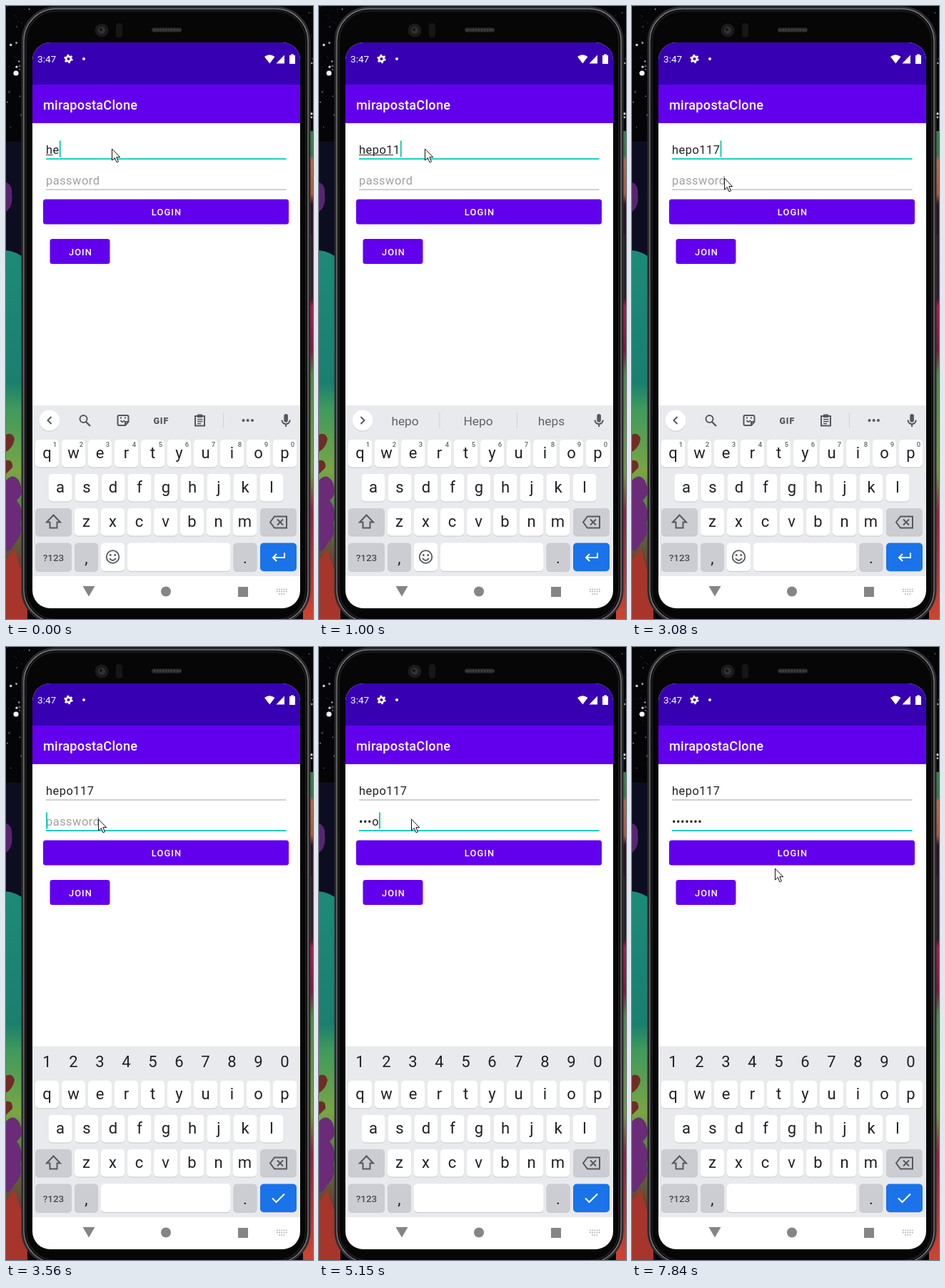
These frames come from a looping animation (430 px wide and 858 px high, 7.99 s). An HTML page:

```html
<!DOCTYPE html>
<html lang="en">
<head>
<meta charset="utf-8">
<title>Login form</title>
<style>
html, body { margin: 0; width: 100%; height: 100%; overflow: hidden; background: #050508; }
svg { display: block; width: 100vw; height: 100vh; }
text { font-family: Roboto, "Noto Sans", sans-serif; white-space: pre; }
.mid { text-anchor: middle; }
.line { fill: none; stroke: #55585d; stroke-width: 2; }
.field { font-size: 16.4px; letter-spacing: .03125em; fill: #222; }
.btn { font-size: 12.8px; font-weight: 500; letter-spacing: .089em; fill: #fff; text-anchor: middle; }
.key { font-size: 22px; fill: #202124; text-anchor: middle; }
.tip { font-size: 9.5px; font-weight: 500; fill: #62656a; text-anchor: middle; }
.word { font-size: 17.3px; fill: #5f6368; text-anchor: middle; }
</style>
</head>
<body>
<svg viewBox="0 0 430 858">
  <defs>
    <linearGradient id="land" x1="0" y1="0" x2="0" y2="1">
      <stop offset="0" stop-color="#1d8a78"/><stop offset=".36" stop-color="#1b7f6e"/>
      <stop offset=".43" stop-color="#3f9a5c"/><stop offset=".6" stop-color="#79a545"/>
      <stop offset=".72" stop-color="#4c7f45"/><stop offset=".86" stop-color="#6d3a30"/>
      <stop offset="1" stop-color="#b8402c"/>
    </linearGradient>
    <linearGradient id="side" x1="0" y1="0" x2="0" y2="1">
      <stop offset="0" stop-color="#3c7f4c"/><stop offset=".05" stop-color="#39774a"/>
      <stop offset=".06" stop-color="#b06a48"/><stop offset=".13" stop-color="#a85a44"/>
      <stop offset=".15" stop-color="#2b1420"/><stop offset=".34" stop-color="#35101f"/>
      <stop offset=".36" stop-color="#a51f4c"/><stop offset=".45" stop-color="#7c1c3c"/>
      <stop offset=".5" stop-color="#4f8a4c"/><stop offset=".7" stop-color="#71983f"/>
      <stop offset=".78" stop-color="#8f2440"/><stop offset="1" stop-color="#cc4530"/>
    </linearGradient>
    <clipPath id="screen"><rect x="37" y="51" width="375" height="792" rx="25"/></clipPath>
  </defs>

  <!-- scenery -->
  <rect width="430" height="858" fill="#050508"/>
  <rect y="190" width="30" height="160" fill="#0d0d22"/>
  <g id="stars" fill="#fff"></g>
  <circle cx="14" cy="94" r="3.6" fill="#f4f4f4"/>
  <path d="M0 247Q9 250 8 262Q10 276 4 284L0 288Z" fill="#59246f"/>
  <path d="M0 342Q15 343 30 356V858H0Z" fill="url(#land)"/>
  <path d="M0 600Q9 596 12 606Q10 618 0 624ZM0 636Q10 634 9 646L0 655Z" fill="#702c24"/>
  <path d="M0 664Q11 652 19 666Q26 684 15 692Q26 706 20 724Q24 742 12 752Q5 766 0 762Z" fill="#6b2b78"/>
  <path d="M0 775L12 760Q20 790 30 805V858H0Z" fill="#a6352b"/>
  <rect x="416" y="175" width="14" height="683" fill="url(#side)"/>

  <!-- phone -->
  <rect x="23" y="2" width="402" height="862" rx="47" fill="#060606" stroke="#2b2b2d" stroke-width="3"/>
  <rect x="25" y="4" width="398" height="858" rx="45" fill="none" stroke="#78787a" stroke-width="1.5"/>
  <rect x="28" y="7" width="392" height="852" rx="42" fill="none" stroke="#1c1c1e" stroke-width="2"/>
  <path d="M427 320V408" stroke="#29292b" stroke-width="3"/>
  <circle cx="134" cy="34" r="9.5" fill="#1b1b1c"/>
  <circle cx="134" cy="34" r="5" fill="#303235"/>
  <circle cx="133" cy="33" r="2" fill="#111"/>
  <rect x="154" y="24" width="9" height="20" rx="4" fill="#161617"/>
  <rect x="204" y="30.5" width="42" height="6" rx="3" fill="#2c2c2d"/>
  <path d="M207 33.5H244" stroke="#474747" stroke-width="2" stroke-dasharray="2 2"/>

  <g clip-path="url(#screen)">
    <rect x="37" y="51" width="375" height="792" fill="#fff"/>
    <rect x="37" y="51" width="375" height="59" fill="#3700b3"/>
    <rect x="37" y="110" width="375" height="54" fill="#6200ee"/>
    <g fill="#fff">
      <text x="44" y="79" font-size="13.6">3:47</text>
      <circle cx="109" cy="74" r="2"/>
      <path d="M362 71Q369 65.5 376.5 71L369.3 80.5ZM378.500 80.500L390 68.500V80.500ZM397 69H399V67.500H403V69H405V81H397Z"/>
      <g fill="none" stroke="#fff">
        <circle cx="87.500" cy="74" r="3.400" stroke-width="2.700"/>
        <circle cx="87.500" cy="74" r="5.200" stroke-width="2" stroke-dasharray="2.72"/>
      </g>
      <text x="52" y="144.500" font-size="18.2" font-weight="500" letter-spacing=".22">mirapostaClone</text>
    </g>

    <!-- form -->
    <rect id="nameLine" x="56" width="336.500"/>
    <rect id="passLine" x="56" width="336.500"/>
    <text id="name" class="field" x="56" y="206.500"></text>
    <rect id="spell" x="56" y="208" height="1" fill="#333"/>
    <text id="hint" class="field" x="56" y="249.500" style="fill:#a0a0a0">password</text>
    <text id="pass" class="field" x="56" y="249.500"></text>
    <rect id="caret" width="2" height="23" fill="#1bc9b7"/>
    <rect x="52" y="270.500" width="344" height="35" rx="3.500" fill="#6200ee"/>
    <text class="btn" x="225" y="293">LOGIN</text>
    <rect x="61.500" y="326" width="84" height="35" rx="3.500" fill="#6200ee"/>
    <text class="btn" x="104.500" y="348.500">JOIN</text>

    <!-- keyboard -->
    <rect x="37" y="559" width="375" height="239" fill="#e8eaed"/>
    <g id="keys"></g>
    <path class="line" d="M66.500 712.500L76 722.500H71.500V730.500H61.500V722.500H57Z"/>
    <path class="line" d="M370 722.500L376 714.500H393V730.500H376ZM380 718.500L388 726.500M388 718.500L380 726.500"/>
    <g id="plain">
      <path d="M304.500 569.500V590.500" id="bar" stroke="#cfd1d5"/>
      <g class="line">
        <circle cx="149.500" cy="771" r="8.800" stroke-width="1.800"/>
        <path d="M145 773Q149.500 779 154 773"/>
      </g>
      <path d="M145 768.500H147.600M151.400 768.500H154" stroke="#55585d" stroke-width="2.600"/>
      <path d="M390 765.500V772H374M379 767L374 772L379 777" fill="none" stroke="#fff" stroke-width="2"/>
      <circle cx="61" cy="581" r="14.800" fill="#d3d5d9"/>
      <circle cx="61" cy="580" r="14.500" fill="#fff"/>
      <path id="chevron" class="line"/>
      <rect x="389.300" y="571" width="5.600" height="11.500" rx="2.800" fill="#55585d"/>
      <path class="line" d="M386.500 579.500A5.600 5.600 0 0 0 397.700 579.500M392.100 585V589" stroke-width="1.800"/>
    </g>
    <g id="tools">
      <g class="line">
        <circle cx="108.500" cy="578" r="5"/>
        <path d="M112 582L118 588" stroke-width="2.400"/>
        <path d="M167 587H158.500Q156.500 587 156.500 585V575Q156.500 573 158.500 573H169.500Q171.500 573 171.500 575V582ZM167 587V582H171.500M160.500 580Q163 584 166 580"/>
        <path d="M265 574H278V587.500H265Z"/>
        <path d="M268 578.500H275.500M268 581.500H275.500M268 584.500H273" stroke-width="1.500"/>
      </g>
      <path d="M160 575.500H162V577.500H160ZM166 575.500H168V577.500H166ZM268 571.500H275V576H268Z" fill="#55585d"/>
      <text class="mid" x="217.300" y="584.500" font-size="12.5" font-weight="900" letter-spacing=".8" fill="#55585d">GIF</text>
      <g fill="#55585d"><circle cx="332.500" cy="580" r="2"/><circle cx="338.700" cy="580" r="2"/><circle cx="345" cy="580" r="2"/></g>
    </g>
    <g id="words">
      <path d="M169 569V591M277.500 569V591" stroke="#cfd1d5"/>
      <text class="word" x="120.500" y="586.500"></text>
      <text class="word" x="223" y="586.500"></text>
      <text class="word" x="325.500" y="586.500"></text>
    </g>
    <g id="secure">
      <path d="M373 771.500L378.500 777L390 765.500" fill="none" stroke="#fff" stroke-width="2"/>
    </g>

    <!-- navigation -->
    <g fill="#858585">
      <path d="M107.500 812H124.500L116 826.500Z"/>
      <circle cx="224" cy="819.500" r="7"/>
      <rect x="325" y="813" width="14" height="14"/>
    </g>
    <path d="M379 816.500H394M379 819.500H394M382 823H391" stroke="#aaa" stroke-width="1.600" stroke-dasharray="1.8 1.4"/>
  </g>
  <path id="mouse" d="M.5 0V16L4.300 12.600L7 18.800L9.500 17.700L6.800 11.600H11.700Z" fill="#fff" stroke="#111"/>
</svg>

<script>
const $ = id => document.getElementById(id);
const LOOP = 7990, NAME = 'hepo117', LEFT = 56;

function add(parent, tag, attrs, text = '') {
  const el = document.createElementNS('http://www.w3.org/2000/svg', tag);
  for (const k in attrs) el.setAttribute(k, attrs[k]);
  el.textContent = text;
  $(parent).append(el);
  return el;
}
const set = (id, attrs) => { for (const k in attrs) $(id).setAttribute(k, attrs[k]); };
const show = (id, on) => set(id, { visibility: on ? 'visible' : 'hidden' });

function key(parent, x, y, w, h, fill) {
  add(parent, 'rect', { x, y: y + 1, width: w, height: h, rx: 5, fill: '#c6c8cc' });
  add(parent, 'rect', { x, y, width: w, height: h, rx: 5, fill });
}

// Seeded stars in the two strips beside the phone
let seed = 7;
const rnd = () => (seed = seed * 16807 % 2147483647) / 2147483647;
for (let i = 0; i < 75; i++) {
  const cx = i % 4 ? rnd() * 34 : 412 + rnd() * 18;
  add('stars', 'circle', { cx, cy: rnd() * 175, r: .3 + rnd() ** 3 * 1.5, opacity: .25 + rnd() * .6 });
}

const GREY = '#cbcdd2';
['qwertyuiop', 'asdfghjkl', 'zxcvbnm'].forEach((row, r) => [...row].forEach((c, i) => {
  const x = [41, 59.500, 96][r] + i * 37, y = 607 + r * 48;
  key('keys', x, y, 33, 38.500, '#fff');
  add('keys', 'text', { class: 'key', x: x + 16.500, y: y + 25.500 }, c);
  if (r) return;
  const n = (i + 1) % 10;
  add('plain', 'text', { class: 'tip', x: x + 27.500, y: 617 }, n);
  add('secure', 'text', { class: 'key', x: x + 16.500, y: 588 }, n);
}));
key('keys', 41, 703, 51, 38.500, GREY);
key('keys', 356, 703, 51, 38.500, GREY);
key('keys', 41, 751.500, 51, 39.500, GREY);
key('keys', 96, 751.500, 33, 39.500, GREY);
key('keys', 318.500, 751.500, 33, 39.500, GREY);
key('keys', 356, 751.500, 51, 39.500, '#1a73e8');
key('keys', 133, 751.500, 33, 39.500, '#fff');
key('keys', 170, 751.500, 144.500, 39.500, '#fff');
key('secure', 133, 751.500, 181.500, 39.500, '#fff');
add('keys', 'text', { class: 'mid', x: 66.500, y: 776.500, 'font-size': 13.500, 'font-weight': 500, fill: '#4a4d52' }, '?123');
add('keys', 'text', { class: 'key', x: 112.500, y: 780 }, ',');
add('keys', 'text', { class: 'key', x: 335, y: 780 }, '.');

// Each row starts with the time from which it holds
const typed = [[0, 2], [120, 3], [270, 4], [850, 5], [1000, 6], [1700, 7]];
const spelled = [[0, 1], [120, 2], [270, 3], [420, 4], [1000, 5], [1150, 6], [1820, 7], [2100, 0]];
const secret = [[0, 0], [4000, 1], [4120, 2], [4270, 3], [5150, 4], [6000, 5], [6280, 6], [6410, 7]];
const blink = [[0, 1], [2500, 0], [3080, 1], [3850, 0], [4000, 1], [4860, 0], [5150, 1],
  [5740, 0], [6000, 1], [6860, 0], [7420, 1], [7840, 0]];
const offers = [[0, ''], [120, 'he her help'], [270, 'hep help helped'], [420, 'hep hope helped'],
  [540, 'hepo Hepo heps'], [1150, ' ']];
const pointer = [[0, 148, 200], [2660, 145, 201], [2800, 138, 219], [2930, 129, 233], [3080, 129, 241],
  [7560, 160, 284], [7680, 185, 314], [7840, 200, 310]];
const at = (rows, t) => rows.findLast(r => r[0] <= t);

function underline(id, y, on) {
  set(id, { y: on ? y - 1 : y - .5, height: on ? 2 : 1, fill: on ? '#1bd3c0' : '#a3a3a3' });
}

function draw(now) {
  const t = now % LOOP;
  const onPass = t >= 3200, secure = t >= 3330, offering = t >= 120 && t < 2100;

  $('name').textContent = NAME.slice(0, at(typed, t)[1]);
  const marked = at(spelled, t)[1];
  set('spell', { width: marked ? $('name').getSubStringLength(0, marked) : 0 });

  const n = at(secret, t)[1], clear = n && t < 7840 ? 1 : 0;
  $('pass').textContent = '•'.repeat(n - clear) + NAME.slice(n - clear, n);
  show('hint', !n);

  underline('nameLine', 214, !onPass);
  underline('passLine', 257, onPass);
  const text = $(onPass ? 'pass' : 'name');
  const end = text.textContent ? text.getComputedTextLength() : 0;
  set('caret', { x: LEFT + end, y: onPass ? 231.500 : 188.500 });
  show('caret', at(blink, t)[1]);

  show('plain', !secure);
  show('secure', secure);
  show('tools', !secure && !offering);
  show('bar', !secure && !offering);
  show('words', offering);
  set('chevron', { d: offering ? 'M58.500 575L63.500 580L58.500 585' : 'M63.500 575L58.500 580L63.500 585' });
  const list = at(offers, t)[1].split(' ');
  $('words').querySelectorAll('text').forEach((el, i) => el.textContent = list[i] || '');

  const [, x, y] = at(pointer, t);
  set('mouse', { transform: `translate(${x} ${y})` });
}

let start;
function frame(now) {
  start ??= now;
  draw(now - start);
  requestAnimationFrame(frame);
}
draw(0);
requestAnimationFrame(frame);
</script>
</body>
</html>
```
